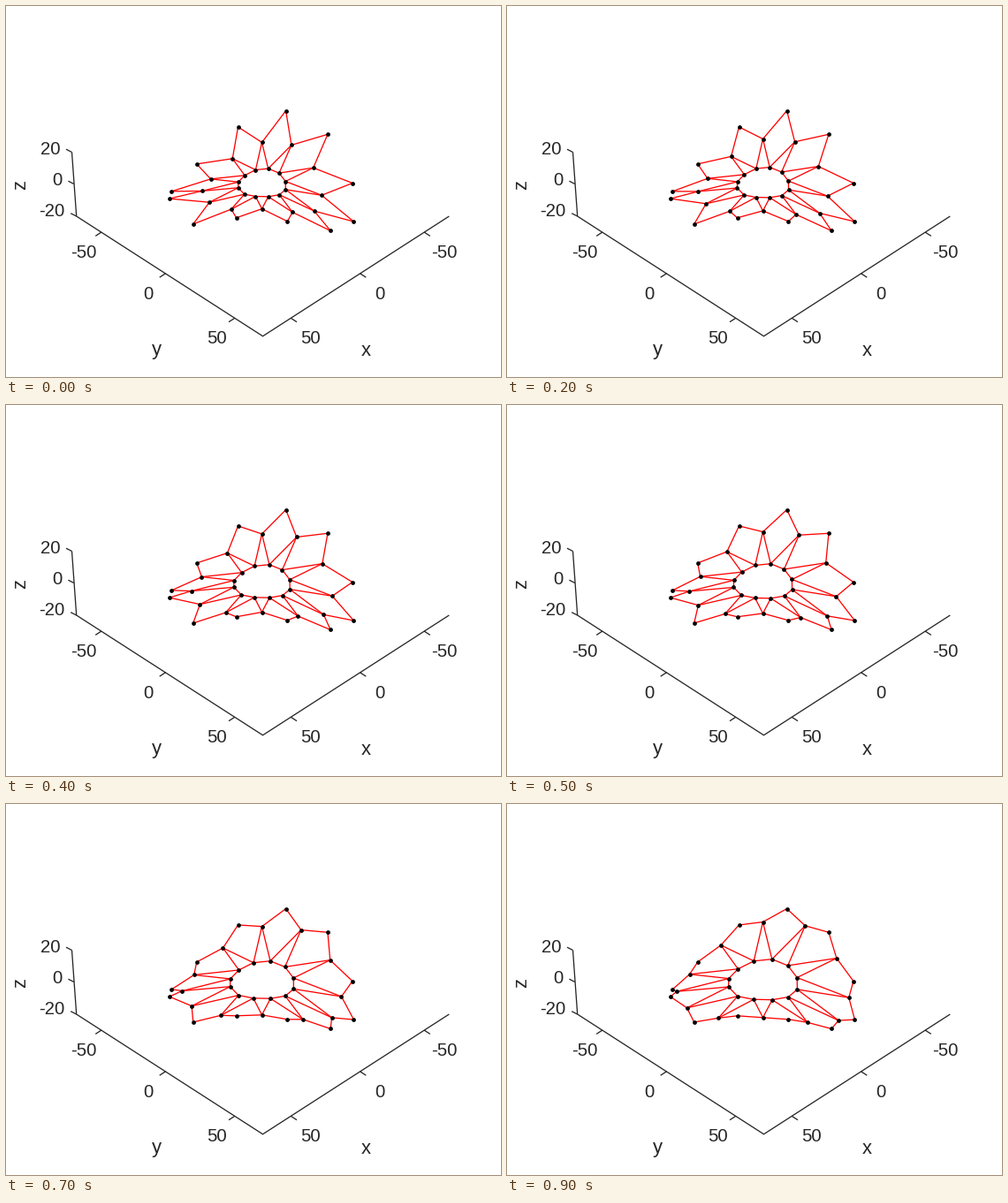
These frames come from a looping animation (560 by 420 pixels, 1000 ms). A matplotlib script:

```python
import numpy as np
import matplotlib.pyplot as plt
from matplotlib.animation import FuncAnimation
from matplotlib.collections import LineCollection

W, H, DPI = 560, 420, 100
PT = 72 / DPI  # points per pixel
FRAMES, INTERVAL = 10, 100
INK = "#262626"

# Perspective camera
CENTER = np.array([290, 203.5])
ELEVATION = np.radians(36)
FOCAL, DISTANCE = 2600, 1211

# The wavy rim stays fixed while the two rings inside it unfold.
N = 12
RIM_RADIUS = 50
RIM_HEIGHTS = np.array([14.75, 8.2, -7.95, -14.2, -3.3, 12.5,
                        14.75, 1, 0.8, -13.4, -11.4, 4.1])
MIDDLE_HEIGHTS = 0.93 * (RIM_HEIGHTS + np.roll(RIM_HEIGHTS, 1)) / 2
INNER_HEIGHTS = 3 + 0.3 * RIM_HEIGHTS


def project(right, near, up):
    s, c = np.sin(ELEVATION), np.cos(ELEVATION)
    scale = FOCAL / (DISTANCE - near * c - up * s)
    return CENTER + np.column_stack([right, near * s - up * c]) * scale[:, None]


def ring(radius, first_angle, rim_heights):
    """Clockwise ring on a cone; heights are those reached at the rim."""
    a = np.radians(first_angle - 360 / N * np.arange(N))
    return project(radius * np.cos(a), -radius * np.sin(a),
                   rim_heights * radius / RIM_RADIUS)


def vertices(frame):
    u = (frame / (FRAMES - 1)) ** 1.12
    return np.vstack([
        ring(RIM_RADIUS, 75, RIM_HEIGHTS),
        ring(31.6 + 13.9 * u, 90, MIDDLE_HEIGHTS),
        ring(12.9 + 5.8 * u, 75, INNER_HEIGHTS)])


def edges():
    for k in range(N):
        prev, middle, inner = (k - 1) % N, N + k, 2 * N + k
        inner_prev = 2 * N + prev
        yield from [(middle, k), (middle, prev), (middle, inner),
                    (middle, inner_prev), (inner, inner_prev)]


EDGES = np.array(list(edges()))

fig = plt.figure(figsize=(W / DPI, H / DPI), dpi=DPI, facecolor="white")
ax = fig.add_axes([0, 0, 1, 1])
ax.set(xlim=(0.5, W + 0.5), ylim=(H + 0.5, 0.5))
ax.axis("off")


def label(x, y, text, size=20.3, ha="center", va="baseline", rotation=0):
    ax.text(x, y, text, family="Liberation Sans", fontsize=size * PT,
            color=INK, ha=ha, va=va, rotation=rotation)


def line(*points):
    ax.plot(*zip(*points), color=INK, lw=1.3 * PT, solid_capstyle="butt",
            solid_joinstyle="miter", snap=False)


def draw_axes():
    corner = 291
    line((75, 166), (80.2, 238.5), (corner, 374.3), (501.8, 238.5))

    for i, (x, y, text) in enumerate([(75, 166, "20"), (77.4, 202, "0"),
                                      (80.2, 238.5, "-20")]):
        line((x, y), (x - 6.5, y - 3.3))
        label(x - 13, 168.5 + 35 * i, text, ha="right")

    # The x and y axes mirror each other about the near corner.
    for offset, y, text in [(182.5, 256.5, "-50"), (110, 303.3, "0"), (31.7, 353.8, "50")]:
        for side in (-1, 1):
            x = corner + side * offset
            line((x, y), (x + side * 6.8, y + 4.4))
            label(x + side * 25 - 7.5 * (side + 1) / 2 + 5, y + 29, text)

    label(408, 396, "x", 22)
    label(171, 396, "y", 22)
    label(17.5, 203, "z", 22, va="center", rotation=90)


draw_axes()
mesh = LineCollection([], colors="red", linewidths=1.3 * PT, zorder=3)
ax.add_collection(mesh)
dots, = ax.plot([], [], "o", color="black", ms=4.8 * PT, mew=0, zorder=4)


def update(frame):
    points = vertices(frame)
    mesh.set_segments(points[EDGES])
    dots.set_data(*points.T)
    return mesh, dots


anim = FuncAnimation(fig, update, frames=FRAMES, interval=INTERVAL,
                     repeat=True, repeat_delay=0)
plt.show()
```
